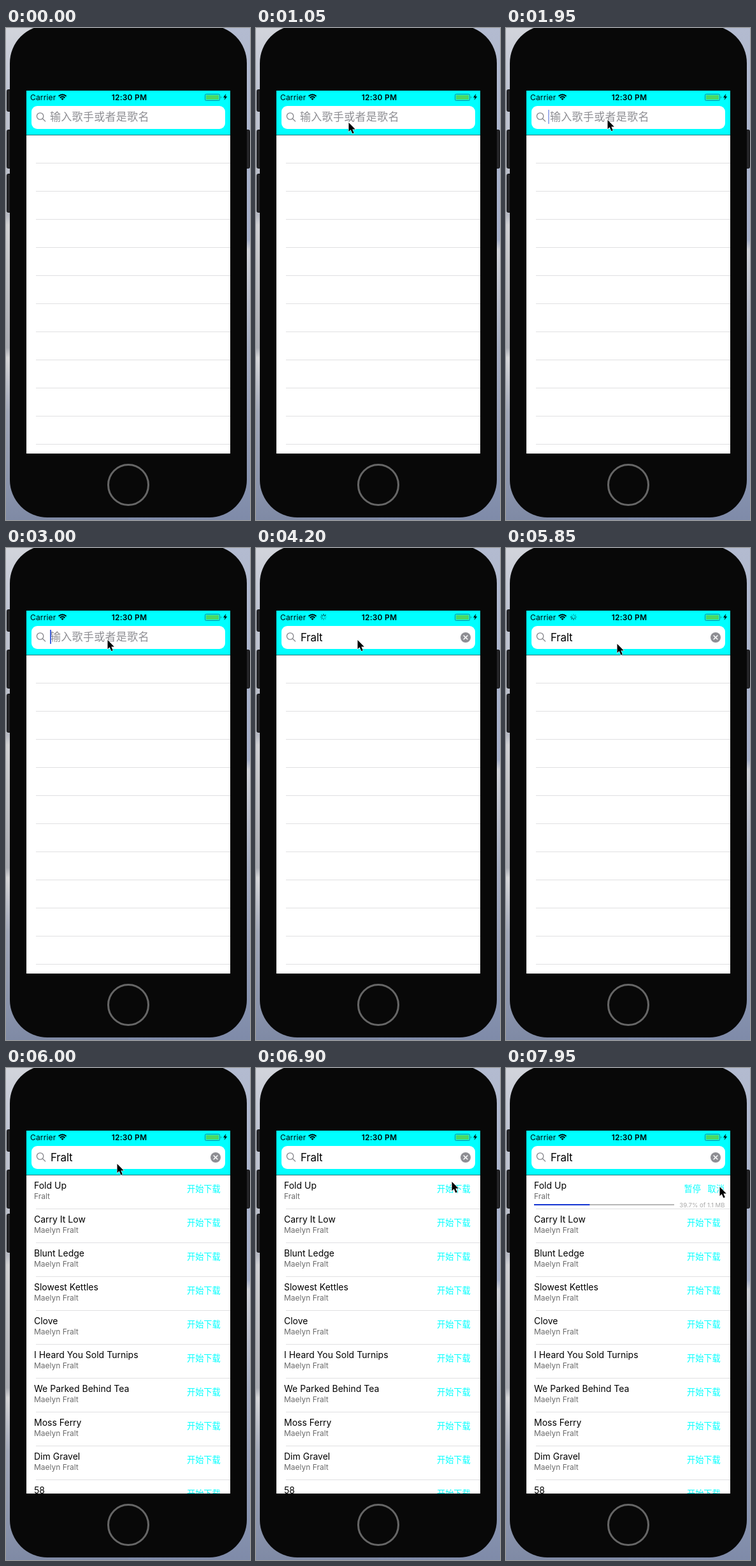
Write an HTML page that moves like this. It is 383 by 770 pixels and loops after 8 s.

```html
<!DOCTYPE html>
<html lang="zh">
<head>
<meta charset="utf-8">
<title>Music search</title>
</head>
<body topmargin="0" rightmargin="0" bottommargin="0" leftmargin="0">
<svg display="block" width="383" height="770" viewBox="0 0 383 770"
  font-family="Inter, 'Noto Sans CJK SC', 'Noto Sans CJK', sans-serif">
  <defs>
    <linearGradient id="left" x2="0" y2="1">
      <stop offset="0" stop-color="#d2d4db"/><stop offset=".12" stop-color="#c0c5d3"/>
      <stop offset=".38" stop-color="#b7bac3"/><stop offset=".4" stop-color="#d0d0d2"/>
      <stop offset=".65" stop-color="#a9abb2"/><stop offset=".67" stop-color="#d5d5d7"/>
      <stop offset=".78" stop-color="#a2a8b8"/><stop offset="1" stop-color="#7f8aa5"/>
    </linearGradient>
    <linearGradient id="right" x2="0" y2="1">
      <stop offset="0" stop-color="#b3bbd0"/><stop offset=".43" stop-color="#a4aec8"/>
      <stop offset=".45" stop-color="#cfd1d8"/><stop offset=".65" stop-color="#a5adc2"/>
      <stop offset="1" stop-color="#7f8ba9"/>
    </linearGradient>
    <clipPath id="screen"><path d="M32 98h320v568h-320z"/></clipPath>
  </defs>

  <path fill="url(#left)" d="M0 0h192v770h-192z"/>
  <path fill="url(#right)" d="M192 0h191v770h-191z"/>
  <g fill="#252528" stroke="#101012">
    <rect x="1.5" y="96.5" width="8" height="34" rx="2"/>
    <rect x="1.5" y="159.5" width="8" height="60" rx="2"/>
    <rect x="1.5" y="228.5" width="8" height="60" rx="2"/>
    <rect x="374.5" y="159.5" width="8" height="60" rx="2"/>
  </g>
  <rect x="6" y="-4" width="372" height="770" rx="59" fill="#080808"/>
  <circle cx="192" cy="715" r="31.5" fill="none" stroke="#666" stroke-width="3"/>

  <g clip-path="url(#screen)">
    <path fill="#fff" d="M32 98h320v568h-320z"/>
    <g id="blank"></g>
    <g id="results"></g>
    <path fill="#00ffff" d="M32 98h320v69h-320z"/>
    <path stroke="#087878" d="M32 167.5h320"/>

    <g font-size="12">
      <text x="38" y="112.5" letter-spacing=".15">Carrier</text>
      <text x="193.5" y="112.5" text-anchor="middle" font-weight="600" letter-spacing=".2">12:30 PM</text>
    </g>
    <g fill="none" stroke="#000" stroke-width="1.9">
      <path d="M82.6 106.8q6-5 12 0M84.8 109.2q3.8-3.2 7.6 0"/>
      <path fill="#000" stroke="none" d="M86.4 110.6q2.2-1.6 4.4 0l-2.2 2.4z"/>
    </g>
    <g id="spinner" transform="translate(106 108)" stroke="#000" stroke-width="1.2" stroke-linecap="round"></g>
    <rect x="312.5" y="103.5" width="23" height="10" rx="1.8" fill="none" stroke="#168a8a"/>
    <rect x="314" y="105" width="20" height="7" fill="#4cd964"/>
    <path fill="#168a8a" d="M337 106.5q2 2 0 4z"/>
    <path d="M345.3 103l-4.3 5.8h2.8l-1.3 4.2 4.7-5.8h-2.9z"/>

    <rect x="40" y="122" width="304" height="36" rx="9" fill="#fff"/>
    <g fill="none" stroke="#85858a" stroke-width="1.3">
      <circle cx="53.6" cy="138" r="5.2"/><path d="M57.4 141.8l4.6 4.6"/>
    </g>
    <text id="hint" x="69" y="145.3" font-size="17" fill="#8e8e93" letter-spacing=".3">输入歌手或者是歌名</text>
    <g id="query">
      <text x="70" y="145.5" font-size="17" letter-spacing="-.2">Fralt</text>
      <circle cx="329" cy="140" r="8" fill="#8e8e93"/>
      <path stroke="#fff" stroke-width="1.6" d="M325.7 136.7l6.6 6.6m0-6.6l-6.6 6.6"/>
    </g>
    <rect id="caret" y="128" width="2" height="22" fill="#4565dc"/>
  </g>
  <path id="pointer" d="M0 0v14.3l3.2-3 2.6 6 2.6-1.1-2.6-5.8h4.5z" stroke="#fff" stroke-width="1.1" paint-order="stroke"/>
</svg>
<script>
const LOOP = 8000, STEP = 150;
const $ = id => document.getElementById(id);
const show = (id, on) => $(id).setAttribute('display', on ? 'inline' : 'none');

const looks = {
  title: 'font-size="14"',
  artist: 'font-size="12" fill="#6b6b6b"',
  button: 'font-size="13.2" font-weight="500" fill="#00ffff"',
  amount: 'font-size="9.6" fill="#aaa" text-anchor="end"'
};
const text = (look, x, y, s, more = '') => `<text ${looks[look]} x="${x}" y="${y}" ${more}>${s}</text>`;
const line = y => `<path stroke="#e0e0e2" d="M47 ${y}.5h305"/>`;

const songs = ['Fold Up', 'Carry It Low', 'Blunt Ledge', 'Slowest Kettles', 'Clove',
  'I Heard You Sold Turnips', 'We Parked Behind Tea', 'Moss Ferry', 'Dim Gravel', '58'];

$('blank').innerHTML = Array.from({length: 11}, (_, i) => line(211 + 44 * i)).join('');
$('results').innerHTML = songs.map((song, i) => {
  const y = 53 * i;
  return text('title', 44, 189 + y, song) +
    text('artist', 44, 205 + y, i ? 'Maelyn Fralt' : 'Fralt') +
    text('button', 284, 194 + y, '开始下载', i ? '' : 'id="start"') + line(220 + y);
}).join('') + `<g id="download">
  ${text('button', 279.5, 194, '暂停')}${text('button', 316.5, 194, '取消')}
  <path fill="#b7b7b7" d="M44 213h220v2h-220z"/>
  <rect id="bar" x="44" y="213" height="2" fill="#1434d2"/>
  ${text('amount', 343.5, 217.5, '', 'id="amount"')}</g>`;
$('spinner').innerHTML = '<path d="M0-2.4V-4.5"/>'.repeat(8);

// pointer path: time, x, y
const path = [
  [450, 236, 397], [600, 203, 322], [750, 155, 225], [900, 130, 167], [1050, 145.5, 148],
  [1200, 154, 145], [1350, 159.5, 144], [4200, 159.5, 144], [4800, 174.5, 150],
  [6150, 174.5, 150], [6300, 186, 178], [6450, 222, 238], [6600, 266, 226],
  [6750, 298, 192], [6900, 307.5, 178], [7350, 307.5, 178], [7950, 335.5, 186]
];

function pointerAt(t) {
  const i = path.findIndex(p => p[0] >= t);
  if (i < 1) return path[i < 0 ? path.length - 1 : 0].slice(1);
  const [a, b] = [path[i - 1], path[i]];
  const k = (t - a[0]) / (b[0] - a[0]);
  return [1, 2].map(n => a[n] + (b[n] - a[n]) * k);
}

function caretOpacity(t) {
  if (t < 1950 || t >= 3450 || t === 2850) return 0;
  return t === 1950 || t === 2700 ? .5 : 1;
}

function draw(now) {
  const t = Math.floor(now % LOOP / STEP) * STEP;
  const typed = t >= 3150, found = t >= 6000, loading = t >= 7350;

  show('pointer', t >= 450);
  $('pointer').setAttribute('transform', `translate(${pointerAt(t)})`);

  show('hint', !typed);
  show('query', typed);
  $('caret').setAttribute('x', typed ? 108 : t < 2100 ? 66 : 69);
  $('caret').setAttribute('opacity', caretOpacity(t));

  show('spinner', t >= 3900 && !found);
  [...$('spinner').children].forEach((blade, i) => {
    const age = (Math.floor(t / 125) - i + 80) % 8;
    blade.setAttribute('transform', `rotate(${i * 45})`);
    blade.setAttribute('opacity', .85 - age * .09);
  });

  show('blank', !found);
  show('results', found);
  show('start', !loading);
  show('download', loading);
  const done = 39.7 * Math.max(0, t - 7350) / 600;
  $('bar').setAttribute('width', 2.2 * done);
  $('amount').textContent = done.toFixed(1) + '% of 1.1 MB';
}

const begin = performance.now();
(function frame() {
  draw(performance.now() - begin);
  requestAnimationFrame(frame);
})();
</script>
</body>
</html>
```
